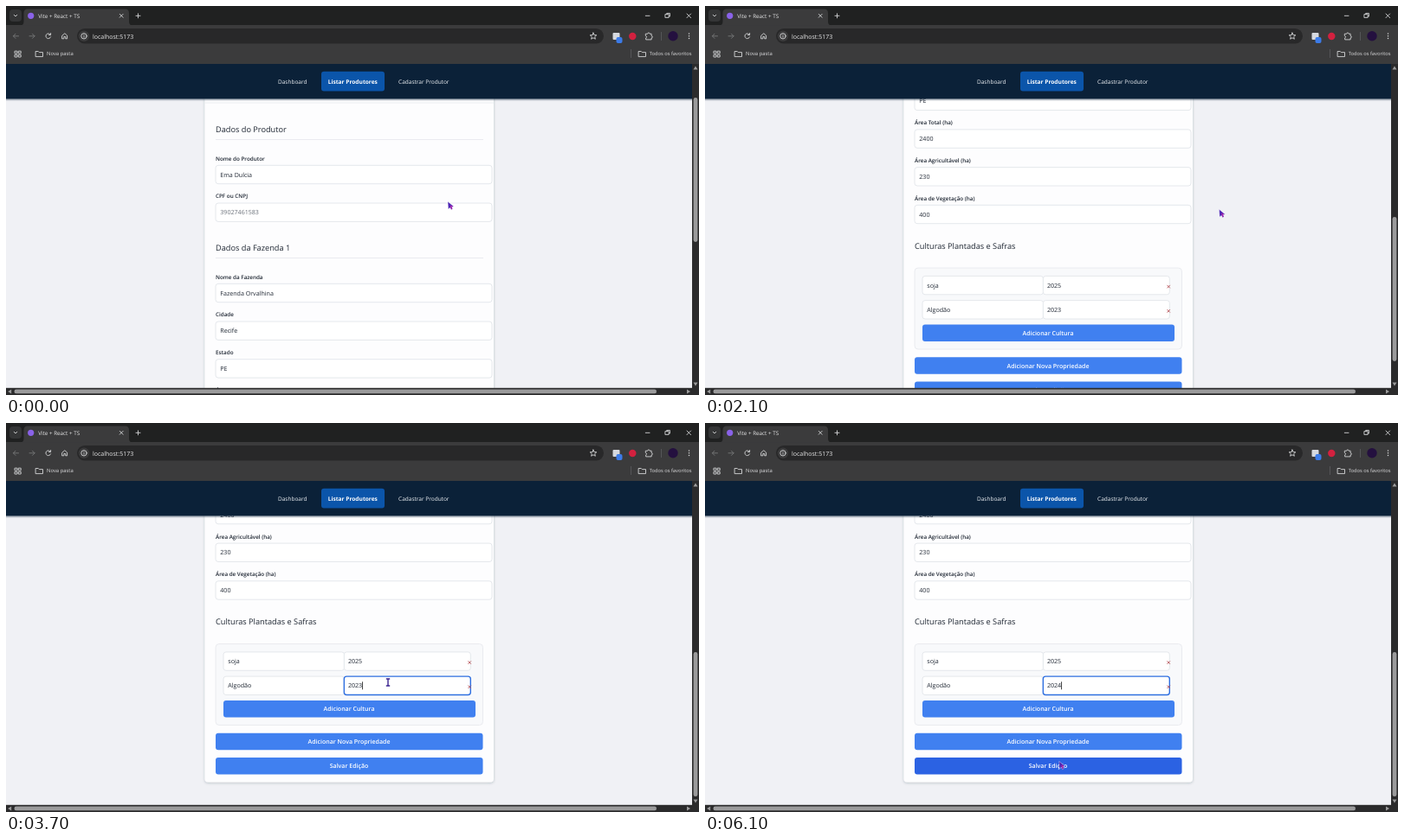
These frames come from a looping animation (800 px wide and 450 px high, 6200 ms). An HTML page:

```html
<!DOCTYPE html>
<html lang="pt-BR">
<head>
<meta charset="utf-8">
<title>Produtores</title>
<style>
html, body { margin: 0; width: 100%; height: 100%; overflow: hidden; background: #202121; }
svg { display: block; width: 800px; height: 450px; }
text { font-family: "Open Sans", "Noto Sans", sans-serif; text-rendering: geometricPrecision; white-space: pre; }
.line { fill: none; stroke: #d4d5d6; stroke-width: .9; stroke-linecap: round; stroke-linejoin: round; }
.dim { stroke: #777879; }
</style>
</head>
<body>
<svg id="stage" viewBox="0 0 800 450">
  <defs>
    <clipPath id="view"><rect y="67" width="792" height="375"/></clipPath>
    <filter id="soft" x="-10%" y="-10%" width="120%" height="120%">
      <feDropShadow dx="0" dy="1" stdDeviation="1.5" flood-color="#1b2a40" flood-opacity=".25"/>
    </filter>
    <linearGradient id="fall" x2="0" y2="1">
      <stop stop-color="#0b2138" stop-opacity=".55"/><stop offset="1" stop-color="#0b2138" stop-opacity="0"/>
    </linearGradient>
  </defs>
  <g clip-path="url(#view)">
    <rect y="67" width="792" height="375" fill="#f0f1f5"/>
    <g id="page"></g>
    <rect y="107" width="792" height="3" fill="url(#fall)"/>
    <g id="nav"></g>
  </g>
  <g id="chrome"></g>
  <g id="arrow">
    <path d="M0 0 L.6 8.8 L2.7 7 L4 9.4 L5.6 8.4 L4.5 6.2 L6.9 5.6Z" fill="#4a22b4" stroke="#fff" stroke-width=".5" stroke-opacity=".7"/>
    <path d="M2.4 4.2 L6.4 5.6 L4.2 6 L5.2 8.3 L4.1 8.9Z" fill="#b526a8"/>
  </g>
  <g id="beam" fill="none">
    <path d="M-2.2 -4H2.2M0 -4V4M-2.2 4H2.2" stroke="#fff" stroke-width="3"/>
    <path d="M-2.2 -4H2.2M0 -4V4M-2.2 4H2.2" stroke="#3b2491" stroke-width="1.4"/>
  </g>
</svg>
<script>
const $ = id => document.getElementById(id);

function add(parent, tag, attrs, content) {
  const el = document.createElementNS("http://www.w3.org/2000/svg", tag);
  for (const k in attrs) el.setAttribute(k, attrs[k]);
  if (content) el.textContent = content;
  return parent.appendChild(el);
}
const box = (g, x, y, width, height, fill, rx = 0, more = {}) =>
  add(g, "rect", { x, y, width, height, fill, rx, ...more });
const line = (g, d, cls = "line") => add(g, "path", { d, class: cls });
const fill = (g, d, color) => add(g, "path", { d, fill: color });
const dot = (g, cx, cy, r, color) => add(g, "circle", { cx, cy, r, fill: color });
// y is the middle of the capitals
const text = (g, s, x, y, size, color, weight = 400, anchor = "start") =>
  add(g, "text", { x, y: y + size * .36, "font-size": size, fill: color, "font-weight": weight, "text-anchor": anchor }, s);

// Page content, laid out for scroll = 0
const page = $("page"), INK = "#1f2733", BLUE = "#4080f0", HOVER = "#2b62e3", MAX = 357;

const input = (x, y, w, value, color = INK, pad = 5.3) => {
  const frame = box(page, x, y - 10.7, w, 21.4, "#fff", 3, { stroke: "#dfe2e7", "stroke-width": .8 });
  return { frame, label: text(page, value, x + pad, y, 7.1, color) };
};
const field = (name, value, y, color) => {
  text(page, name, 242, y, 6.3, INK, 600);
  input(242, y + 18.5, 319, value, color);
};
const heading = (s, y, rule) => {
  text(page, s, 242, y, 9.2, INK, 500);
  if (rule) box(page, 242, y + 11.6, 309, .8, "#e6e8ec");
};
const button = (s, x, y, w) => {
  const el = box(page, x, y, w, 19.5, BLUE, 3);
  text(page, s, 396, y + 9.8, 7, "#fff", 600, "middle");
  return { el, x, y: y - MAX, w };
};

box(page, 229.5, 40, 333.5, 732.5, "#fdfdfe", 4, { filter: "url(#soft)" });
box(page, 229.5, 111.6, 333.5, .8, "#e6e8ec");
heading("Dados do Produtor", 142.5, true);
field("Nome do Produtor", "Ema Dulcia", 176.5);
field("CPF ou CNPJ", "39027461583", 220.2, "#6a7079");
heading("Dados da Fazenda 1", 279.5, true);
[["Nome da Fazenda", "Fazenda Orvalhina"], ["Cidade", "Recife"], ["Estado", "PE"],
 ["Área Total (ha)", "2400"], ["Área Agricultável (ha)", "230"], ["Área de Vegetação (ha)", "400"]]
  .forEach(([name, value], i) => field(name, value, 313.5 + i * 43.7));
heading("Culturas Plantadas e Safras", 587);
box(page, 242, 612.5, 308.5, 94, "#f8f9fb", 4, { stroke: "#e6e8ec", "stroke-width": .8 });

const rows = [["soja", "2025", 632.6], ["Algodão", "2023", 660.8]].map(([crop, year, y]) => {
  input(251, y, 139.5, crop);
  const cell = input(390.3, y, 146, year, INK, 4.6);
  add(page, "path", { d: `M533.5 ${y - .2}l3.4 3.4m0 -3.4l-3.4 3.4`, stroke: "#b2454b", "stroke-width": .85, fill: "none" });
  return { ...cell, y: y - MAX };
});
const year = rows[1];
const caret = box(page, 0, 656.3, .8, 9, "#111");
const buttons = [
  button("Adicionar Cultura", 251, 678, 291),
  button("Adicionar Nova Propriedade", 242, 715.7, 308.5),
  button("Salvar Edição", 242, 744.1, 308.5)
];

// Site navigation
const nav = $("nav");
box(nav, 0, 67, 792, 40.3, "#0b2138");
box(nav, 364, 75.7, 73, 22.8, "#0b55aa", 3);
text(nav, "Dashboard", 330.7, 87.2, 6.5, "#f2f5f8", 500, "middle");
text(nav, "Listar Produtores", 400.3, 87.2, 6.6, "#fff", 700, "middle");
text(nav, "Cadastrar Produtor", 482.3, 87.2, 6.5, "#f2f5f8", 500, "middle");

// Browser frame
const ui = $("chrome"), LIGHT = "#d9dadb";
box(ui, 0, 0, 800, 23, "#202121");
box(ui, 0, 22, 800, 45, "#3b3b3c");
fill(ui, "M16 22.5Q20.500 22.5 20.500 18V8Q20.500 3.500 25 3.500H137.500Q142 3.500 142 8V18Q142 22.500 146.500 22.500Z", "#3b3b3c");
box(ui, 4, 4, 14, 14, "#343536", 4);
line(ui, "M9.200 10.300L11 12L12.800 10.300");
dot(ui, 28.7, 11.3, 3.6, "#8a62e8");
text(ui, "Vite + React + TS", 37.2, 11.3, 6.3, "#e6e6e7");
line(ui, "M131.300 9.400l3.800 3.800m0 -3.800l-3.800 3.800");
line(ui, "M150 11.300h5m-2.500 -2.500v5");
line(ui, "M738.300 11.300h4.700");
line(ui, "M761.300 9.600h3.800v3.800h-3.800zM762.700 9.400v-1h3.700v3.700h-1");
line(ui, "M786 9l4.600 4.600m0 -4.600l-4.600 4.600");

line(ui, "M14.500 34.800h-6m2.500 -2.600l-2.600 2.600l2.600 2.600", "line dim");
line(ui, "M27 34.800h6m-2.500 -2.600l2.600 2.600l-2.600 2.600", "line dim");
line(ui, "M51.200 33A2.900 2.900 0 1 0 51.600 35.800M51.600 31.500v2h-2");
line(ui, "M65 34.100l2.800 -2.400l2.800 2.400v3.700h-1.900v-2.400h-1.800v2.400h-1.900z");
box(ui, 82, 26, 608, 17.6, "#282829", 8.8);
dot(ui, 90, 34.8, 6.2, "#3b3b3c");
add(ui, "circle", { cx: 90, cy: 34.8, r: 3.2, class: "line" });
line(ui, "M90 34.800v1.400M90 33.200v.1");
text(ui, "localhost:5173", 100, 35, 7, "#e8e8e9");
const star = Array.from({ length: 10 }, (_, i) => {
  const a = -Math.PI / 2 + i * Math.PI / 5, r = i % 2 ? 1.8 : 4;
  return `${678 + r * Math.cos(a)} ${35 + r * Math.sin(a)}`;
});
line(ui, `M${star.join("L")}Z`);
box(ui, 700.5, 31, 8, 8, "#d6d9df", 1);
box(ui, 704.5, 36, 7, 7, "#3c7be8", 2);
dot(ui, 723.3, 35, 4.2, "#d3213f");
line(ui, "M738.700 32.200h2a1.200 1.200 0 0 1 2.400 0h2v2.400a1.200 1.200 0 0 1 0 2.400v1.900h-6.400v-2a1.200 1.200 0 0 0 0 -2.300z");
box(ui, 756, 30, .7, 10, "#626365");
dot(ui, 770, 34.8, 5.7, "#24103f");
for (const y of [32, 34.8, 37.6]) dot(ui, 788.5, y, .75, LIGHT);

for (const x of [10.4, 14.6]) for (const y of [52.2, 56.4]) box(ui, x, y, 2.6, 2.6, "none", 0, { class: "line" });
const folder = x => line(ui, `M${x} 52.500h2.800l1 1.100h4.200v5h-8z`);
folder(34.5);
text(ui, "Nova pasta", 47, 55.3, 5.9, "#dddddf");
box(ui, 721, 50, .7, 10, "#626365");
folder(730.5);
text(ui, "Todos os favoritos", 742.7, 55.3, 5.75, "#dddddf");

// Scrollbars
const GREY = "#9b9b9c";
box(ui, 792, 67, 8, 383, "#2b2b2c");
box(ui, 0, 441.8, 800, 8.2, "#2b2b2c");
fill(ui, "M793.500 73.500h5l-2.500 -4zM793.500 435.500h5l-2.500 4zM6.200 443.500v5l-4 -2.500zM786 443.500v5l4 -2.500z", GREY);
box(ui, 9.5, 443.6, 741.5, 4.6, GREY, 2.3);
const thumb = box(ui, 793.6, 106, 4.8, 167, GREY, 2.4);

// Motion: [time, values...]
const LOOP = 6200;
const SCROLL = [[0, 0], [900, 99], [1700, 217], [2100, 309.5], [2400, 350], [2600, MAX]];
const POINTER = [[0, 510, 226.3], [600, 596.5, 233.2], [1700, 595, 235], [2100, 593.5, 235.3], [2400, 590, 238],
  [2800, 446, 300], [3000, 441, 303], [3600, 441, 300], [5000, 441, 300], [5500, 414, 388], [5800, 410, 394], [6100, 408.7, 391.3]];
const FOCUS = 3400, ERASE = 4200, TYPE = 4900;

function at(keys, t) {
  const i = keys.findIndex(k => k[0] > t);
  if (i < 0) return keys[keys.length - 1].slice(1);
  const a = keys[i - 1], b = keys[i], p = (t - a[0]) / (b[0] - a[0]);
  return a.slice(1).map((v, j) => v + (b[j + 1] - v) * p);
}

function render(t) {
  const [scroll] = at(SCROLL, t), [x, y] = at(POINTER, t);
  page.setAttribute("transform", `translate(0 ${-scroll})`);
  thumb.setAttribute("y", 106 + scroll * .4455);

  const value = t < ERASE ? "2023" : t < TYPE ? "202" : "2024";
  year.label.textContent = value;
  const focused = t >= FOCUS;
  year.frame.setAttribute("stroke", focused ? "#2f6fe0" : "#dfe2e7");
  year.frame.setAttribute("stroke-width", focused ? 1.4 : .8);
  const since = t - (t < ERASE ? FOCUS : t < TYPE ? ERASE : TYPE);
  caret.setAttribute("opacity", focused && since % 1000 < 500 ? 1 : 0);
  caret.setAttribute("x", 395 + year.label.getComputedTextLength());

  const settled = scroll === MAX;
  const typing = settled && x > 251 && x < 536 && rows.some(r => Math.abs(y - r.y) < 11);
  for (const b of buttons) {
    const over = settled && x > b.x && x < b.x + b.w && y > b.y && y < b.y + 19.5;
    b.el.setAttribute("fill", over ? HOVER : BLUE);
  }
  for (const [id, on] of [["arrow", !typing], ["beam", typing]]) {
    $(id).setAttribute("transform", `translate(${x} ${y})`);
    $(id).setAttribute("visibility", on ? "visible" : "hidden");
  }
}

const start = performance.now();
function tick() {
  const t = (performance.now() - start) % LOOP;
  render(Math.floor(t / 100) * 100);
  requestAnimationFrame(tick);
}
tick();
</script>
</body>
</html>
```
